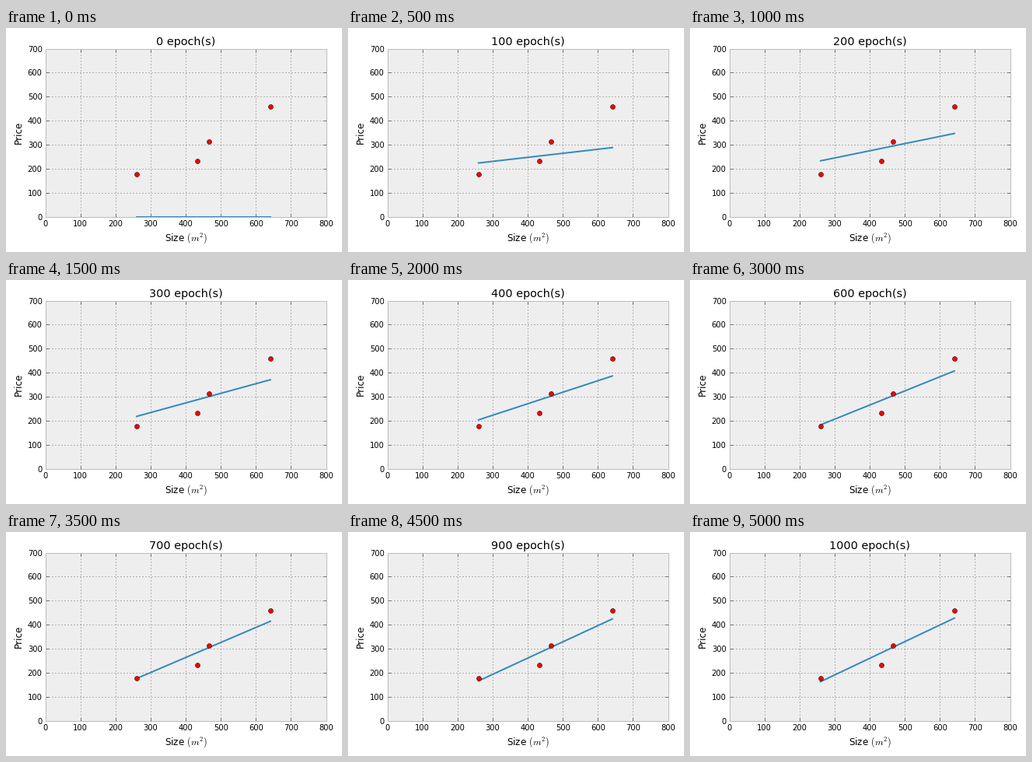
Animation, 432 px wide and 288 px high, one loop 5.5 s. Source, as a matplotlib script:

```python
import numpy as np
import matplotlib.pyplot as plt
from matplotlib.animation import FuncAnimation

W, H, DPI = 432, 288, 72
FRAMES, INTERVAL, STEP = 11, 500, 100
RATE = 0.01

plt.rcParams.update({
    "font.family": "DejaVu Sans",
    "font.size": 10,
    "text.kerning_factor": 6,
    "mathtext.fontset": "cm",
    "lines.scale_dashes": False,
    "axes.facecolor": "#eeeeee",
    "axes.edgecolor": "#bcbcbc",
    "axes.linewidth": 1.0,
    "axes.axisbelow": True,
    "axes.titlesize": 14.4,
    "axes.titlepad": 5,
    "axes.labelsize": 12,
    "axes.labelpad": 5,
})

size = np.array([260, 434, 466, 641])
price = np.array([176, 232, 312, 459])
scaled = (size - size.mean()) / np.ptp(size)


def fit(epochs):
    """Line after some epochs of batch gradient descent, in closed form."""
    var = np.mean(scaled ** 2)
    bias = price.mean() * (1 - (1 - 2 * RATE) ** epochs)
    best = np.mean(scaled * price) / var
    slope = best * (1 - (1 - 2 * RATE * var) ** epochs)
    return bias + slope * scaled


fig = plt.figure(figsize=(W / DPI, H / DPI), dpi=DPI, facecolor="white")
left, right, bottom, top = 50.6, 411.6, 45.45, 261.4
ax = fig.add_axes([left / W, bottom / H, (right - left) / W, (top - bottom) / H])
ax.set(xlim=(0, 800), ylim=(0, 700), ylabel="Price", xlabel="Size $(m^2)$")
ax.set_xticks(range(0, 801, 100))
ax.set_yticks(range(0, 701, 100))
ax.tick_params(direction="in", length=4, width=0.5, pad=4, top=True, right=True)
ax.grid(color="black", linewidth=0.5, linestyle=(0, (1, 3)))

line, = ax.plot(size, fit(0), color="#348abd", linewidth=2,
                solid_capstyle="projecting", solid_joinstyle="round")
ax.plot(size, price, "o", color="red", markersize=6,
        markeredgecolor="black", markeredgewidth=0.5, zorder=3)
title = ax.set_title("0 epoch(s)")


def update(i):
    epochs = i * STEP
    line.set_ydata(fit(epochs))
    title.set_text(f"{epochs} epoch(s)")
    return line, title


anim = FuncAnimation(fig, update, frames=FRAMES, interval=INTERVAL,
                     repeat=True, repeat_delay=0, blit=False)
plt.show()
```
